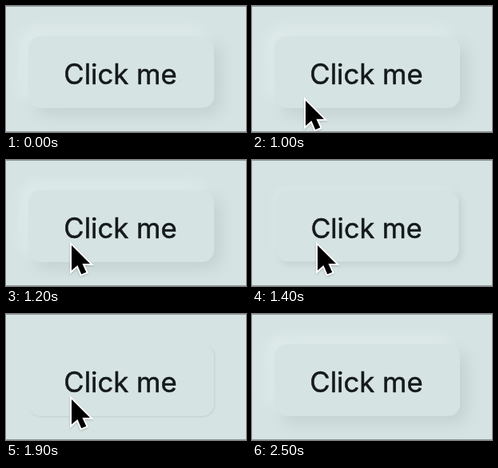
Animation of 300 by 158 pixels, one loop 3900 ms. Source, as an HTML page:

```html
<!DOCTYPE html>
<html lang="en">
<head>
<meta charset="utf-8">
<title>Soft button</title>
<style>
  html, body { margin: 0; width: 100%; height: 100%; overflow: hidden; background: #d6e3e3; }
  #stage { position: relative; width: 300px; height: 158px; overflow: hidden; }
  #stage::before, #stage::after {
    content: ""; position: absolute; left: 0; width: 100%; height: 1px; background: #929b9d;
  }
  #stage::before { top: 0; }
  #stage::after { bottom: 0; }
  #button {
    position: absolute; left: 28px; top: 38px; width: 232px; height: 90px;
    border-radius: 15px; background: #d6e3e3; color: #14191c;
    font: 400 34.7px/94px Inter, "Open Sans", sans-serif;
    -webkit-text-stroke: 0.5px; text-align: center; text-indent: -2px; white-space: nowrap;
  }
  svg { position: absolute; left: 0; top: 0; z-index: 1; }
  #cursor { filter: drop-shadow(0 1px 1px #0003); }
</style>
</head>
<body>
<div id="stage">
  <div id="button">Click me</div>
  <svg width="300" height="158">
    <path id="cursor" d="M0 0V31.5L7.4 25 12.2 36.2 18.3 33.7 13.4 23H23Z"
      fill="#000" stroke="#fff" stroke-width="4" paint-order="stroke"/>
  </svg>
</div>
<script>
  const LOOP = 3900, STEP = 100;
  const button = document.getElementById("button");
  const cursor = document.getElementById("cursor");

  const clamp = (v, low = 0) => Math.min(1, Math.max(low, v));

  function draw(now) {
    // the picture changes ten times a second
    const t = Math.floor(now % LOOP / STEP) * STEP;

    // the pointer glides in, slowing down, and later speeds away
    const enter = 1 - (1 - clamp((t - 800) / 400, -0.25)) ** 2.2;
    const leave = clamp((t - 2200) / 300) ** 2;
    const x = 13 + 69 * enter - 83 * leave;
    const y = 161 - 54 * enter + 82 * leave;
    cursor.setAttribute("transform", `translate(${x} ${y})`);

    // the size springs back sooner than the shadow
    const press = clamp((t - 1300) / 200);
    const release = clamp((t - 1800) / 200);
    const scale = 1 - 0.03 * (press - clamp(2 * release));
    const depth = 1 - press + release ** 3;
    const d = 9 * depth, blur = 18 * depth;
    button.style.transform = scale < 1 ? `scale(${scale})` : "none";
    button.style.boxShadow = depth
      ? `${d}px ${d}px ${blur}px #c5d2d2, ${-d}px ${-d}px ${blur}px rgb(224 236 236 / ${depth})`
      : "none";
  }

  const start = performance.now();
  function tick() {
    draw(performance.now() - start);
    requestAnimationFrame(tick);
  }
  tick();
</script>
</body>
</html>
```
